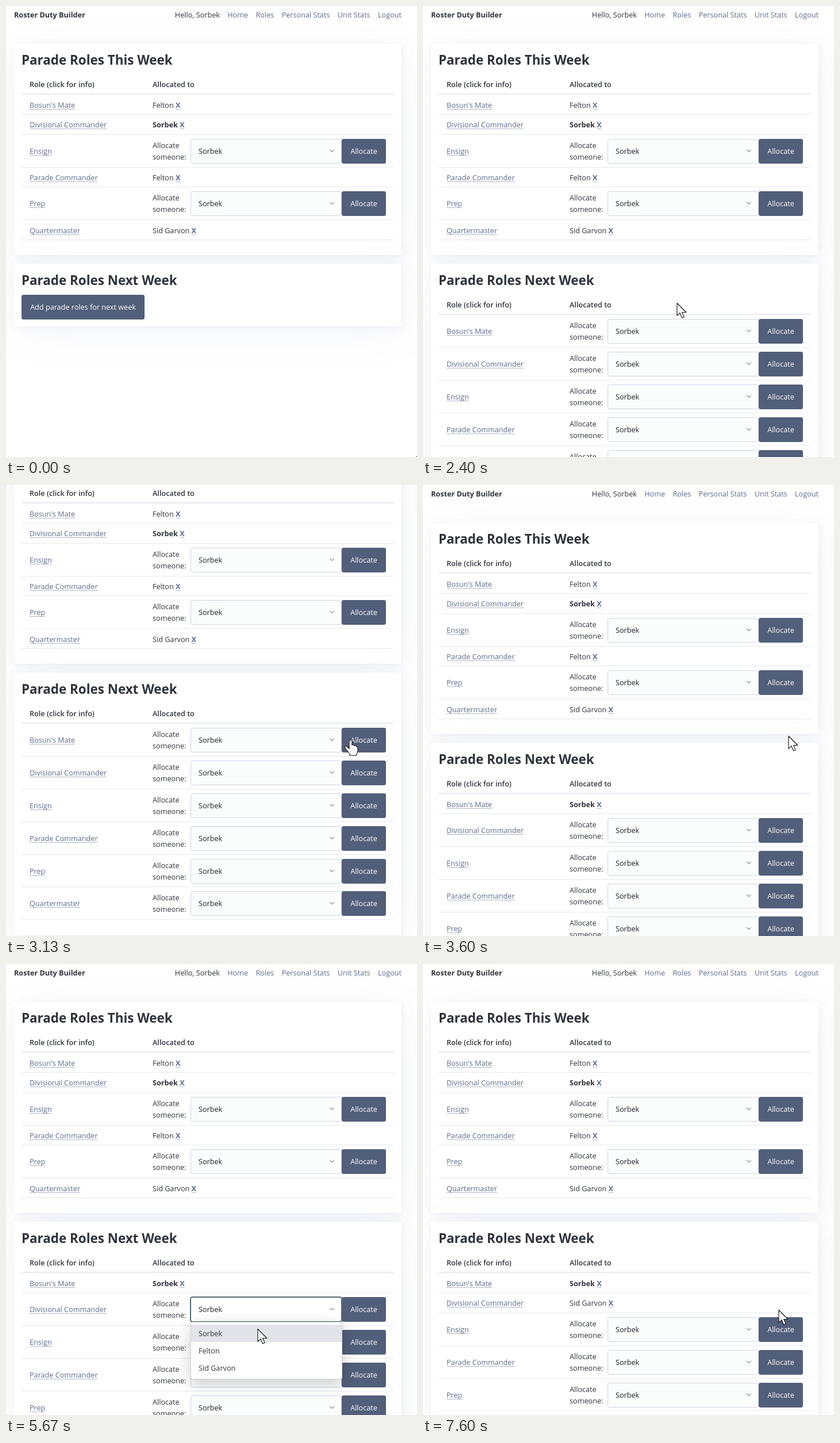
These frames come from a looping animation (715 px wide and 784 px high, 8 s). An HTML page:

```html
<!DOCTYPE html>
<html lang="en">
<head>
<meta charset="utf-8">
<title>Roster Duty Builder</title>
<style>
html, body { margin: 0; width: 100%; height: 100%; overflow: hidden; background: #fff; }
#stage {
  position: relative; width: 715px; height: 784px; overflow: hidden; background: #fff;
  font: 12.65px/20px "Open Sans", "Noto Sans", sans-serif; color: #2f333b;
}
#stage * { position: absolute; box-sizing: border-box; }
#stage span { white-space: pre; }
#stage span b, #stage span a, #stage nav span { position: static; }
#page { left: 0; top: 0; width: 715px; height: 1000px; }
nav { right: 27px; top: 5px; display: flex; gap: 13.4px; }
.card {
  left: 13px; width: 675px; background: #fff; border-radius: 3.4px;
  box-shadow:
    .2px .4px 2.4px rgba(129,145,181,.017), .5px .9px 5.5px rgba(129,145,181,.024),
    .85px 1.7px 10.2px rgba(129,145,181,.03), 1.5px 3px 18.4px rgba(129,145,181,.036),
    2.8px 5.7px 34px rgba(129,145,181,.043), 6.8px 13.6px 81.6px rgba(129,145,181,.06),
    0 0 0 .85px rgba(129,145,181,.015);
}
.h2 { font-size: 22.4px; font-weight: 700; }
.th { font-weight: 600; }
.bold, .x { font-weight: 700; }
.link { color: #5d6b89; }
.under {
  color: #5d6b89; text-decoration: underline 1px rgba(93,107,137,.5);
  text-underline-offset: 2px; text-decoration-skip-ink: none;
}
.line { left: 27px; width: 648px; height: 1px; background: #e7eaf0; }
.head { height: 2px; }
.btn {
  height: 43px; border-radius: 3.4px; background: #525f7a; color: #fff;
  text-align: center; line-height: 43px; white-space: nowrap;
}
.hot { background: #48536b; }
.sel {
  left: 321px; width: 263px; height: 43px; border: 1px solid #cfd5e2; border-radius: 3.4px;
  background: #fbfcfc; color: #1f2228; padding-left: 13px; line-height: 41px;
}
.sel svg { left: 238px; top: 13px; width: 13.6px; height: 13.6px; }
.focus { z-index: 1; background: #fff; border-color: #526a6c; box-shadow: 0 0 0 1px #526a6c; }
#menu {
  left: 321px; top: 622px; width: 264px; height: 100px; border: 1px solid #d0d0d7;
  border-radius: 4px; background: #fff; box-shadow: 0 8px 28px rgba(0,0,0,.2);
}
#menu div { left: 0; width: 262px; height: 30px; padding-left: 13px; line-height: 30px; }
#menu .on { background: #e2e4ea; }
#status {
  left: 0; top: 780px; width: 280px; height: 8px; background: #f2f3f5;
  border: 1px solid #c9ccd2; border-left: 0; border-radius: 0 3px 0 0;
}
#cursor { left: 0; top: 0; width: 1px; height: 1px; overflow: visible; }
#cursor, #cursor path { pointer-events: none; }
#cursor path { fill: #fff; stroke: #111; stroke-width: 1.1; stroke-linejoin: round; }
</style>
</head>
<body>
<div id="stage">
  <div id="page"></div>
  <div id="menu"></div>
  <div id="status"></div>
  <svg id="cursor">
    <path id="arrow" d="M0 .5V22.4L4.9 17.7 8.5 26 12.1 24.4 8.6 16.5H15.8Z"/>
    <path id="hand" d="M-3 1.5Q-3-1-.5-1 2-1 2 1.5V8.5Q2.4 7 4.2 7.3 6 7.6 6 9.6 7 8.3 8.5 9 9.6 9.6 9.6 11 12 10.6 12 13V18Q12 21 10 23.5V26H-2V23.5Q-5 20-7.5 16.5-11.2 12.4-10.3 11-8.5 9-5.5 12L-3 14.5Z"/>
  </svg>
</div>
<script>
const $ = id => document.getElementById(id);
const ME = 'Sorbek', PAL = 'Felton', GUEST = 'Sid Garvon';
const ROLES = ["Bosun's Mate", 'Divisional Commander', 'Ensign', 'Parade Commander', 'Prep', 'Quartermaster'];

// Times in ticks, 15 to the second
const RATE = 15, TICKS = 120;
const LINK = 22, ADDED = 25, FIRST = 52, FOCUS = 80, PICKED = 94, SECOND = 114;

// Eased moves: start, end, destination
const MOVES = [
  [3, 6, 698, 682], [9, LINK, 204, 529], [34, 36, 442, 516], [43, 47, 600, 444],
  [47, 51, 636, 436], [59, 63, 525, 601], [66, 73, 445, 646], [73, 79, 452, 604],
  [81, 92, 405, 704], [PICKED - 1, 98, 382, 691], [100, 110, 619, 601]
];
const SCROLLS = [[38, 42, 126], [45, 47, 122]];

function follow(from, moves, t) {
  return moves.reduce((pos, [start, end, ...to]) => {
    const u = Math.min(1, Math.max(0, (t - start) / (end - start)));
    const e = u * u * (3 - 2 * u);
    return pos.map((v, i) => v + (to[i] - v) * e);
  }, from).map(Math.round);
}
const pointer = t => follow([714, 783], MOVES, t);

const text = (x, y, cls, s) =>
  `<span class="${cls}" style="left:${x}px;top:${Math.round(y) - 10}px">${s}</span>`;
const card = (top, bottom) =>
  `<div class="card" style="top:${top}px;height:${bottom - top}px"></div>`;
const line = (y, cls = '') => `<div class="line ${cls}" style="top:${y}px"></div>`;
const button = (x, y, w, s) =>
  `<div class="btn" style="left:${x}px;top:${y}px;width:${w}px">${s}</div>`;
const CHEVRON = '<svg viewBox="0 0 24 24"><path d="M6 9l6 6 6-6" fill="none" stroke="#8891a4" ' +
  'stroke-width="2" stroke-linecap="round" stroke-linejoin="round"/></svg>';

const holder = (y, name) => text(255, y, '',
  `<b style="font-weight:${name === ME ? 700 : 400}">${name}</b> <a class="under x">X</a>`);
const form = (y, name, focus) =>
  text(255, y + 11, '', 'Allocate') + text(255, y + 31, '', 'someone:') +
  `<div class="sel ${focus ? 'focus' : ''}" style="top:${y}px">${name}${CHEVRON}</div>` +
  button(584, y, 77, 'Allocate');

function table(top, names, focus, pick) {
  let y = top + 88;
  let out = text(41, top + 70, 'th', 'Role (click for info)') +
    text(255, top + 70, 'th', 'Allocated to') + line(y - 2, 'head');
  ROLES.forEach((role, i) => {
    const name = names[i], box = Math.round(y + 7);
    const mid = name ? y + 17.6 : box + 21;
    out += text(41, mid, 'under', role) +
      (name ? holder(mid, name) : form(box, i === focus ? pick : ME, i === focus));
    y += name ? 34.85 : 56.9;
    out += line(Math.round(y - 1));
  });
  return { html: out, bottom: Math.round(y + 26.5) };
}

const NAV = ['Home', 'Roles', 'Personal Stats', 'Unit Stats', 'Logout'];
const TOP = text(14, 15, 'bold', 'Roster Duty Builder') +
  `<nav><span>Hello, ${ME}</span>${NAV.map(s => `<span class="link">${s}</span>`).join('')}</nav>` +
  card(66, 433) + text(27, 94, 'h2', 'Parade Roles This Week') +
  table(66, [PAL, ME, null, PAL, null, GUEST]).html;

function nextWeek(t) {
  const title = text(27, 477, 'h2', 'Parade Roles Next Week');
  if (t < ADDED) {
    return card(448, 557) + title + button(27, 502, 214, 'Add parade roles for next week');
  }
  const focus = t >= FOCUS && t < SECOND ? 1 : -1;
  const names = [t >= FIRST && ME, t >= SECOND && GUEST];
  const body = table(449, names, focus, t < PICKED ? ME : GUEST);
  return card(448, body.bottom) + title + body.html;
}

const show = (id, on) => { $(id).style.display = on ? 'block' : 'none'; };

function buttonAt([x, y]) {
  const el = document.elementFromPoint(x, y);
  return el && el.closest('.btn');
}

function drawMenu(t, y) {
  show('menu', t > FOCUS && t < PICKED);
  const at = Math.max(0, Math.min(2, Math.floor((y - 627) / 30)));
  $('menu').innerHTML = [ME, PAL, GUEST].map((s, i) =>
    `<div class="${i === at ? 'on' : ''}" style="top:${4 + i * 30}px">${s}</div>`).join('');
}

function draw(t) {
  $('page').innerHTML = TOP + nextWeek(t);
  const scroll = t < FIRST ? follow([0], SCROLLS, t)[0] : 0;
  $('page').style.transform = `translateY(${-scroll}px)`;

  const at = pointer(t);
  drawMenu(t, at[1]);
  show('status', t >= LINK && t < ADDED);
  $('status').style.opacity = t === LINK ? .5 : 1;

  // The button darkens one tick after the pointer enters it
  const over = buttonAt(at);
  if (over && buttonAt(pointer(t - 1)) === over) over.classList.add('hot');
  show('arrow', !over);
  show('hand', over);
  $('cursor').style.transform = `translate(${at[0]}px,${at[1]}px)`;
}

let last = -1;
function frame(now) {
  const t = Math.floor((now + 5) * RATE / 1000) % TICKS;
  if (t !== last) draw(last = t);
  requestAnimationFrame(frame);
}
draw(0);
requestAnimationFrame(frame);
</script>
</body>
</html>
```
